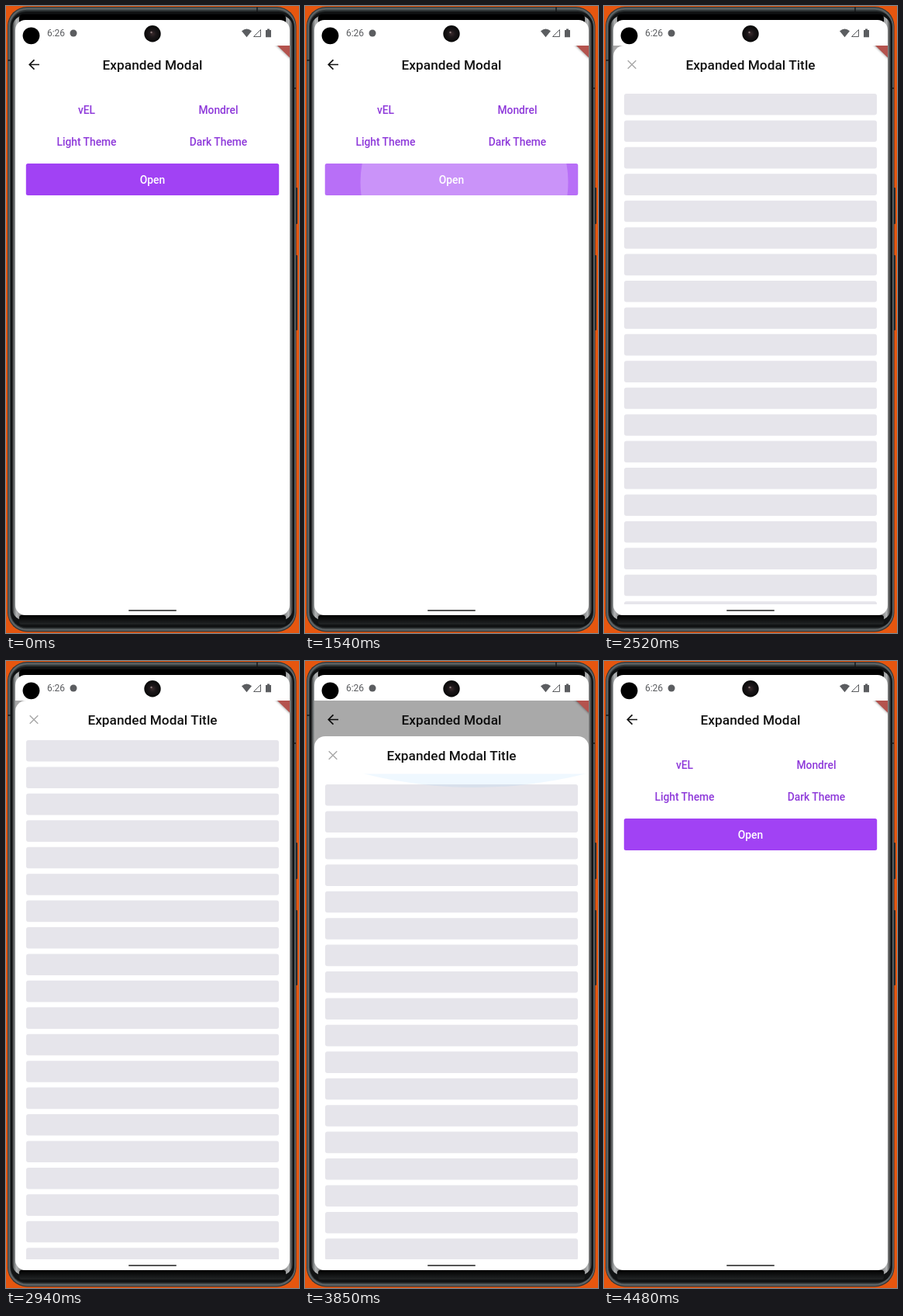
These frames come from a looping animation (378 px wide and 808 px high, 5180 ms). An HTML page:

```html
<!DOCTYPE html>
<html lang="en">
<head>
<meta charset="utf-8">
<title>Expanded Modal</title>
<style>
  html, body { margin: 0; width: 100%; height: 100%; overflow: hidden; background: #e6560f; }
  svg { display: block; width: 378px; height: 808px; }
  text { font-family: Roboto, sans-serif; font-weight: 500; text-anchor: middle; }
  .title { font-size: 17.2px; letter-spacing: .06px; fill: #111; }
  .label { font-size: 13.8px; fill: #8e39da; }
  .line { fill: none; stroke-width: 1.7; }
</style>
</head>
<body>
<svg viewBox="0 0 378 808">
  <defs>
    <linearGradient id="side">
      <stop offset="0" stop-color="#222"/><stop offset=".008" stop-color="#7c8081"/>
      <stop offset=".016" stop-color="#b4b6b7"/><stop offset=".045" stop-color="#555"/>
      <stop offset=".06" stop-color="#000"/><stop offset=".94" stop-color="#000"/>
      <stop offset=".955" stop-color="#555"/><stop offset=".985" stop-color="#b4b6b7"/>
      <stop offset="1" stop-color="#222"/>
    </linearGradient>
    <linearGradient id="chin" x2="0" y2="1">
      <stop offset="0" stop-color="#000"/><stop offset="1" stop-color="#222526"/>
    </linearGradient>
    <radialGradient id="lens">
      <stop offset="0" stop-color="#3a2a2c"/><stop offset=".4" stop-color="#1c1719"/>
      <stop offset="1" stop-color="#080808"/>
    </radialGradient>
    <filter id="soft"><feGaussianBlur stdDeviation="1.5"/></filter>
    <clipPath id="screen"><rect x="12" y="18" width="354" height="767" rx="13"/></clipPath>
    <clipPath id="page"><rect x="12" y="51" width="354" height="734"/></clipPath>
    <clipPath id="button"><rect x="25.8" y="203.1" width="326.4" height="41" rx="2.5"/></clipPath>
    <clipPath id="list"><rect id="listBox" x="12" width="354"/></clipPath>
  </defs>

  <!-- phone body -->
  <g fill="#20282b">
    <rect x="372" y="234" width="4" height="47" rx="1"/>
    <rect x="372" y="321" width="4" height="97" rx="1"/>
  </g>
  <rect x="2" y="1" width="372.5" height="805.5" rx="25" fill="#303536"/>
  <rect x="4" y="3.5" width="368.5" height="800.5" rx="23" fill="none" stroke="#5d6365" stroke-width="2.4"/>
  <rect x="6" y="7" width="366" height="794" rx="20" fill="#111314"/>
  <rect x="8" y="12" width="362" height="780" rx="16" fill="url(#side)"/>
  <rect x="17" y="10.5" width="344" height="20" rx="5" fill="#000"/>
  <rect x="17" y="785" width="344" height="12" rx="3" fill="url(#chin)"/>
  <path d="M324 1.5v5.5M2.5 70h3.5M371 106h3" stroke="#16191a" stroke-width="1.5"/>

  <g clip-path="url(#screen)">
    <rect x="12" y="18" width="354" height="767" fill="#fff"/>

    <g clip-path="url(#page)">
      <path class="line" d="M43 75.5H30.5M36.5 69.3L30.3 75.5L36.5 81.7" stroke="#111"/>
      <text class="title" x="189" y="82">Expanded Modal</text>
      <text class="label" x="104" y="139">vEL</text>
      <text class="label" x="274" y="139">Mondrel</text>
      <text class="label" x="104" y="180">Light Theme</text>
      <text class="label" x="274" y="180">Dark Theme</text>
      <g clip-path="url(#button)">
        <rect x="25" y="203" width="328" height="42" fill="#a142f4"/>
        <rect id="press" x="25" y="203" width="328" height="42" fill="#fff"/>
        <circle id="splash" cx="205.5" cy="227" fill="#fff"/>
      </g>
      <text class="label" x="189" y="228.5" style="fill:#fff">Open</text>
      <rect id="scrim" x="12" y="51" width="354" height="734"/>

      <g id="sheet">
        <rect x="12" y="51" width="354" height="760" rx="14" fill="#fff"/>
        <path class="line" d="M30.7 70.2l10.6 10.6M41.3 70.2l-10.6 10.6" stroke="#aaa" style="stroke-width:1.5"/>
        <text class="title" x="189" y="82">Expanded Modal Title</text>
      </g>
      <g clip-path="url(#list)">
        <g id="bars" fill="#e6e5eb"></g>
        <ellipse id="glow" cx="219" rx="531" ry="478" fill="#2196f3"/>
      </g>

      <!-- corner ribbon -->
      <path d="M347 49h22v21z" opacity=".4" filter="url(#soft)"/>
      <path d="M350 51h16v15.5z" fill="#b4534e"/>
    </g>

    <!-- status bar -->
    <g fill="#5b5d60">
      <text x="64.5" y="39.3" style="font-size:12px;font-weight:400">6:26</text>
      <circle cx="87" cy="35" r="4.5"/>
      <path d="M304 32.2Q310.5 27 317 32.2L310.5 40.3z"/>
      <path d="M328.5 30.5v9h-9z" fill="none" stroke="#5b5d60"/>
      <path d="M335 31h2v-1.5h3V31h2v9.3h-7z"/>
    </g>
    <circle cx="32.5" cy="38.3" r="10.9"/>
    <circle cx="189" cy="35.7" r="10.7" fill="url(#lens)"/>
    <circle cx="187.5" cy="34" r="1.2" fill="#877"/>
    <rect x="158" y="778" width="62" height="2" rx="1" fill="#555"/>
  </g>
</svg>
<script>
const LOOP = 5180, STEP = 70, TOP = 51, HEIGHT = 734;
const el = id => document.getElementById(id);
const set = (id, attrs) => {
  for (const name in attrs) el(id).setAttribute(name, attrs[name]);
};
const clamp = v => Math.max(0, Math.min(1, v));
const ramp = (t, from, to) => clamp((t - from) / (to - from));

// Piecewise linear track of [time, value] points
function track(points, t) {
  if (t <= points[0][0]) return points[0][1];
  for (let i = 1; i < points.length; i++) {
    const [t0, a] = points[i - 1], [t1, b] = points[i];
    if (t <= t1) return a + (b - a) * (t - t0) / (t1 - t0);
  }
  return points[points.length - 1][1];
}

// cubic-bezier(0, 0, .2, 1)
function decelerate(x) {
  let lo = 0, hi = 1;
  for (let i = 0; i < 24; i++) {
    const u = (lo + hi) / 2;
    if (.6 * u * u + .4 * u ** 3 < x) lo = u; else hi = u;
  }
  return 3 * lo * lo - 2 * lo ** 3;
}

const scroll = [[2730, 0], [2800, 2], [2940, 11], [3080, 21], [3150, 21], [3500, 18], [3640, 0]];
const drag = [[3640, 0], [3780, 22], [3920, 70], [4130, 159], [4270, 225], [4340, 420], [4410, 640], [4480, HEIGHT]];

for (let i = 0; i < 20; i++) {
  const bar = document.createElementNS("http://www.w3.org/2000/svg", "rect");
  const attrs = { x: 26, y: 113 + i * 34.43, width: 326, height: 27.6, rx: 3 };
  for (const name in attrs) bar.setAttribute(name, attrs[name]);
  el("bars").append(bar);
}

function draw(t) {
  const fade = 1 - ramp(t, 1750, 2030);
  set("press", { opacity: .24 * ramp(t, 1120, 1330) * fade });
  set("splash", {
    r: track([[1120, 0], [1190, 24], [1540, 134], [1750, 134], [2030, 230]], t),
    opacity: .25 * ramp(t, 1120, 1260) * fade
  });

  const y = t < 2200 ? HEIGHT * (1 - decelerate(ramp(t, 1750, 1980))) : track(drag, t);
  const away = y / HEIGHT;
  set("scrim", { opacity: .34 * (1 - away * away) });
  set("sheet", { transform: `translate(0 ${y})` });
  set("bars", { transform: `translate(0 ${y - track(scroll, t)})` });

  const head = TOP + 48.5 + y;
  set("listBox", { y: head, height: Math.max(0, 771 - head) });
  const depth = t > 3600 ? Math.min(60, y * .38) : 0;
  set("glow", { cy: head + depth - 478, opacity: .12 * clamp(depth / 30) });
}

function frame(now) {
  draw(Math.floor(now % LOOP / STEP) * STEP);
  requestAnimationFrame(frame);
}
draw(0);
requestAnimationFrame(frame);
</script>
</body>
</html>
```
